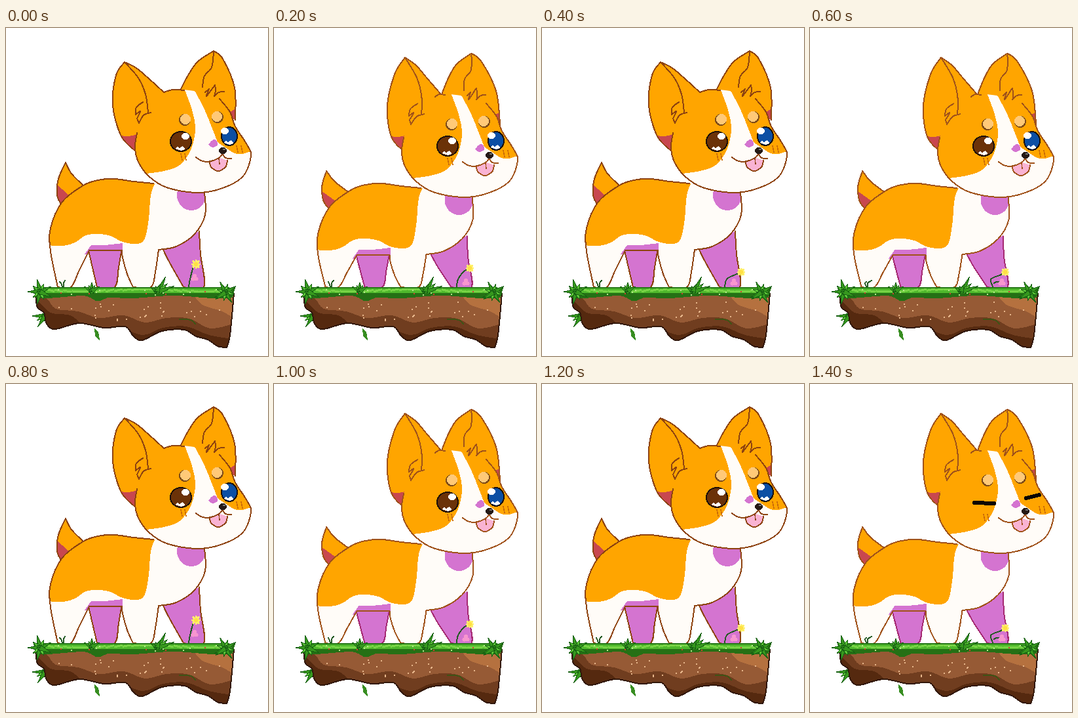
An HTML page for the animation above (1600 ms loop, 400 px wide and 500 px high).

```html
<!DOCTYPE html>
<html lang="en">
<head>
<meta charset="utf-8">
<title>Puppy on a floating island</title>
<style>
html, body { margin: 0; width: 100%; height: 100%; overflow: hidden; background: #fff; }
svg { display: block; width: 400px; height: 500px; shape-rendering: crispEdges; }
path { stroke-linecap: round; stroke-linejoin: round; }
</style>
</head>
<body>
<svg id="stage" viewBox="0 0 400 500"></svg>
<script>
const NS = 'http://www.w3.org/2000/svg';
const stage = document.getElementById('stage');
const STEP = 200, LOOP = 1600;
const ORANGE = '#ffa500', CREAM = '#fffcf8', PURPLE = '#d474d0', RED = '#c8474f';
const still = (x, y) => [x, y];
let clips = 0;

function add(parent, tag, attrs = {}) {
  const el = document.createElementNS(NS, tag);
  for (const k in attrs) el.setAttribute(k, attrs[k]);
  parent.appendChild(el);
  return el;
}

// Smooth line through "x y,x y"; "/" makes a corner. Each point passes through warp.
function curve(text, warp = still) {
  let d = '', last = null;
  for (const part of text.split('/')) {
    const p = part.split(',').map(s => warp(...s.trim().split(' ').map(Number)));
    if (last) p.unshift(last); else d = 'M' + p[0];
    for (let i = 0; i < p.length - 1; i++) {
      const a = p[i - 1] || p[i], b = p[i], c = p[i + 1], e = p[i + 2] || c;
      d += `C${b.map((v, k) => v + (c[k] - a[k]) / 6)} ${c.map((v, k) => v - (e[k] - b[k]) / 6)} ${c}`;
    }
    last = p[p.length - 1];
  }
  return d;
}
const fill = (g, text, color, warp) => add(g, 'path', { d: curve(text, warp) + 'Z', fill: color });
const line = (g, text, color, width = 2, warp) =>
  add(g, 'path', { d: curve(text, warp), fill: 'none', stroke: color, 'stroke-width': width });
const oval = (g, [cx, cy], rx, ry, color, more) => add(g, 'ellipse', { cx, cy, rx, ry, fill: color, ...more });

// A filled form with markings cut to its edge; only the edge is inked, not the join.
function form(g, edge, join, color, ink, warp, markings) {
  const shape = fill(g, edge + join, color, warp);
  if (markings) {
    const id = 'clip' + clips++;
    add(add(g, 'clipPath', { id }), 'path', { d: shape.getAttribute('d') });
    markings(add(g, 'g', { 'clip-path': `url(#${id})` }));
  }
  line(g, edge, ink, 2, warp);
}

// low = 0 stands tall, low = 1 is crouched; feet stay planted, ears swing inwards.
function pose(low) {
  const move = (dx, dy) => (x, y) => [x + low * dx(y), y + low * dy(y)];
  const lift = y => (188 - y) / 136;
  return {
    body: move(() => -0.5, y => 7 * Math.max(0, Math.min(1, (395 - y) / 50))),
    tail: move(y => (y - 270) / 6, y => 7 + (270 - y) / 11),
    head: move(() => -2, () => 7),
    earL: move(y => 19 * lift(y), y => 6 * lift(y) - 13 * lift(y) ** 4),
    earR: move(y => -14 * lift(y), y => 7 - 3 * lift(y))
  };
}

function drawEye(g, [x, y], rx, ry, color, side) {
  oval(g, [x, y], rx, ry, color, { stroke: '#1c1009', 'stroke-width': 2 });
  oval(g, [x + side * 7, y - 8], 6, 5, '#fff');
  const low = y + ry - 1;
  fill(g, `${x - 9} ${low - 3}/${x - 5} ${low - 6}/${x - 2} ${low - 4}/${x + 3} ${low - 7}/${x + 6} ${low - 2},${x} ${low}`, '#fff');
}

function drawBrow(g, [x, y], side) {
  oval(g, [x + side, y + 1], 9, 9, '#7c4a18');
  oval(g, [x, y], 8, 8, '#ffc978');
}

function drawFace(g, warp, ink) {
  const at = (x, y) => warp(x, y);
  drawBrow(g, at(274, 139), -1);
  drawBrow(g, at(322, 135), 1);
  for (const [x, y] of [[267, 192], [273, 192], [352, 180], [359, 180]])
    line(g, `${x} ${y},${x + 2} ${y + 9}`, '#c96a08', 1.5, warp);

  const open = add(g, 'g'), shut = add(g, 'g', { visibility: 'hidden' });
  drawEye(open, at(267, 173), 16, 15, '#6b3208', 1);
  drawEye(open, at(341, 165), 12, 14, '#0c4fa4', -1);
  line(shut, '253 174,283 175', '#080404', 6, warp);
  line(shut, '332 167,352 162', '#080404', 6, warp);

  fill(g, '309 178,314 172,320 170,323 178,316 182,309 178', PURPLE, warp);
  form(g, '311 203,313 212,324 218,335 212,338 202', '/326 198', '#f9b3d3', ink, warp);
  line(g, '290 197,300 203,313 203,325 198,331 192/335 198,344 199', ink, 2, warp);
  line(g, '325 199,326 207', ink, 1.5, warp);
  oval(g, at(331, 187), 6, 5, '#251a16');
  oval(g, at(333, 185), 2, 1, '#777');
  return { open, shut };
}

function drawDog(low) {
  const g = add(stage, 'g'), w = pose(low);
  const ink = low ? '#a0521a' : '#8e4310', farInk = low ? '#a52a72' : ink;

  form(g, '118 240,100 222,91 205/80 230,78 255,85 270', '', ORANGE, ink, w.tail, m =>
    fill(m, '70 232,86 246,97 256/85 275/70 270', RED, w.tail));
  form(g, '125 335,132 365,139 395/166 395,172 365,177 335', '', PURPLE, farInk, w.body);
  form(g, '238 334,250 358,271 395/302 395,297 345,295 310', '', PURPLE, farInk, w.body);

  const feet = '79 395/99 395,112 369,127 339/177 339/178 350,185 375,194 395/221 395,228 372,233 338';
  form(g, `225 237,195 234,165 230,140 232,118 240,86 265,68 305,68 340,${feet}/260 333,288 314,304 285,303 250`,
    '/225 237', CREAM, ink, w.body, m => {
      fill(m, '50 330,85 332,105 327,122 316,142 314,160 317,178 326,200 329,212 321,218 290,222 250,235 225/50 225', ORANGE, w.body);
      fill(m, '130 331,150 331,178 328/178 345/120 345', PURPLE, w.body);
      oval(m, w.body(283, 255), 22, 23, PURPLE);
    });

  form(g, '198 188,176 165,163 118,168 72,181 52/199 61,219 78,241 98', '', ORANGE, ink, w.earL, m =>
    fill(m, '160 161,187 165,210 158/198 195/160 195', RED, w.earL));
  form(g, '266 95,278 72,293 51,317 35/331 47,349 91,350 140', '/320 125', ORANGE, ink, w.earR, m =>
    fill(m, '335 132,356 120/356 145/335 145', RED, w.earR));

  form(g, '326 108,342 128,350 150,368 178,374 196,361 227,328 245,290 251,245 243,218 226,202 204,197 182,200 160',
    '/212 125,241 98/255 94,270 94,305 99,326 108', ORANGE, ink, w.head, m =>
      fill(m, '272 92,284 125,289 155,282 186,265 209,241 218,205 223/205 260/385 260/385 182/368 190,352 192,336 183,323 174/314 151,303 124,286 92', CREAM, w.head));
  line(g, '241 98,255 94,272 95', ink, 2, (x, y) => w.head(x + low * (254 - x) / 2, y));

  line(g, '182 53,202 76,213 101,217 128', ink, 2, w.earL);
  line(g, '209 113,199 121,198 132/205 127,200 138/203 145/210 133,221 129', ink, 2, w.earL);
  line(g, '317 37,314 60,303 73,300 90', ink, 2, w.earR);
  line(g, '304 98,310 93/306 104,319 87/320 95,318 104/325 98,333 97', ink, 2, w.earR);
  return { g, ...drawFace(g, w.head, ink) };
}

function seeded(seed) {
  return () => (seed = (seed * 16807) % 2147483647) / 2147483647;
}

// A fan of pointed blades; angles run in degrees, 90 is straight up.
function tuft(g, x, y, size, from, to, count) {
  for (let i = 0; i < count; i++) {
    const a = (from + (to - from) * i / (count - 1)) * Math.PI / 180;
    const r = size * (i % 2 ? 0.72 : 1), c = Math.cos(a), s = -Math.sin(a);
    const blade = `${x - 4 * s} ${y + 4 * c}/${x + r * c} ${y + r * s}/${x + 4 * s} ${y - 4 * c}`;
    add(g, 'path', { d: curve(blade) + 'Z', fill: i % 2 ? '#5cc737' : '#36981e', stroke: '#176012' });
  }
}

function drawGround() {
  const g = add(stage, 'g'), rnd = seeded(71);
  const speck = (x, y, color) => add(g, 'rect', { x: Math.round(x), y: Math.round(y), width: 2, height: 2, fill: color });

  tuft(g, 60, 439, 20, 180, 235, 3);
  form(g, '45 405/48 426,58 434,62 451,75 459,112 450,150 457,182 455,194 469,208 476,238 462,272 460,290 470,308 475,323 485,337 487/342 468,348 405',
    '', '#965a35', '#32180b', still, m => {
      fill(m, '285 405/300 422,330 432,350 444/350 405', '#b5713f');
      fill(m, '40 405/62 412,76 428,110 432,142 442,180 438,212 449,245 442,280 443,312 458,350 450/350 495/40 495', '#703d1f');
      fill(m, '40 410/50 417,68 434,98 438,116 452/90 470/40 470', '#55290f');
      fill(m, '180 458,210 468,240 457,275 455,310 468,345 474/345 495/180 495', '#55290f');
    });
  for (let i = 0; i < 30; i++) speck(80 + rnd() * 245, 415 + rnd() * 30, '#e8b78c');

  // Ragged turf with one longer clump near the left.
  let turf = '42 396/350 396';
  for (let x = 346; x > 42; x -= 6)
    turf += `/${x} ${410 + 2 * Math.sin(x) + 8 * Math.exp(-(((x - 140) / 11) ** 2))}`;
  fill(g, turf, '#257015');
  add(g, 'rect', { x: 44, y: 396, width: 300, height: 8, fill: '#4fb92c' });
  line(g, '57 396,340 396', '#267917');
  for (let x = 62; x < 330; x += 13)
    line(g, `${x} ${400 + 2 * Math.sin(x)},${x + 11} ${400 + 2 * Math.cos(x)}`, '#78d446', 3);
  for (let i = 0; i < 16; i++) speck(65 + rnd() * 265, 397 + rnd() * 9, i % 3 ? '#b7e88f' : '#d13b31');

  tuft(g, 52, 402, 19, 25, 335, 9);
  tuft(g, 335, 403, 18, 205, -145, 9);
  tuft(g, 131, 401, 13, 150, 30, 5);
  tuft(g, 233, 402, 25, 65, 20, 3);
  tuft(g, 231, 402, 12, 145, 70, 3);
  fill(g, '135 458/141 464,143 476/136 470', '#378d20');
  line(g, '265 444,275 444,284 446,289 451', '#3e5415');
}

// The breeze pushes the flower head through four places; curl bends its stem.
const breeze = [
  { x: 290, y: 360, curl: 0, lean: 0 },
  { x: 299, y: 366, curl: 0, lean: 1 },
  { x: 304, y: 372, curl: 1, lean: 1 },
  { x: 298, y: 372, curl: -5, lean: 4 }
];
function drawFlower({ x, y, curl, lean }) {
  const g = add(stage, 'g'), green = '#245a24';
  for (const side of [-1, 1])
    line(g, `${87 + side} 394,${86 + 2 * side} 389,${86 + 4 * side + lean} ${386 - side}`, green);
  line(g, `279 394,${281 + curl} 383,${(281 + x) / 2} ${y + 5},${x - 3} ${y + 2}`, green);
  if (curl < 0) line(g, '281 389,285 387,291 388', green);

  const heart = [lean ? 293 : 288, lean ? 388 : 381];
  for (let k = 0; k < 3; k++) {
    const a = k * Math.PI * 2 / 3 + 0.5;
    oval(g, [heart[0] + 3 * Math.cos(a), heart[1] + 3 * Math.sin(a)], 3, 3, '#f796cf');
  }
  for (let k = 0; k < 8; k++) {
    const a = k * Math.PI / 4, r = lean ? 5 : 6;
    line(g, `${x} ${y},${x + r * Math.cos(a)} ${y + r * Math.sin(a)}`, '#fff06a', 3);
  }
  oval(g, [x, y], 3, 3, '#ffe045');
  return g;
}

const dogs = [0, 1].map(drawDog);
drawGround();
const flowers = breeze.map(drawFlower);
const show = (el, on) => el.setAttribute('display', on ? 'inline' : 'none');

function render(time) {
  const step = Math.floor((time % LOOP) / STEP);
  const blink = step === 7;
  dogs.forEach((dog, i) => {
    show(dog.g, step % 2 === i);
    dog.open.setAttribute('visibility', blink ? 'hidden' : 'inherit');
    dog.shut.setAttribute('visibility', blink ? 'inherit' : 'hidden');
  });
  flowers.forEach((flower, i) => show(flower, step % 4 === i));
}

const start = performance.now();
function tick() {
  render(performance.now() - start);
  requestAnimationFrame(tick);
}
tick();
</script>
</body>
</html>
```
